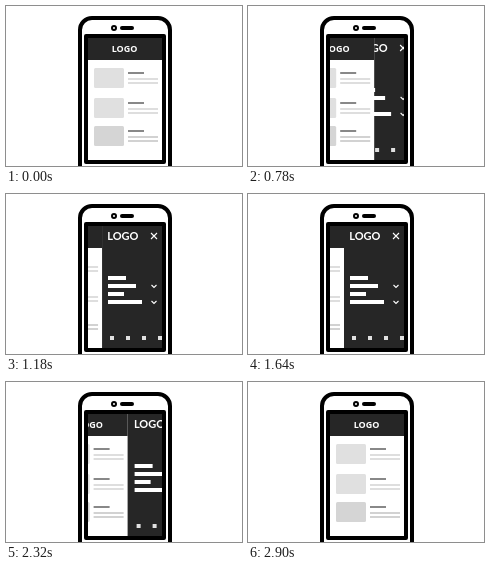
Recreate the animation shown at these times as an HTML page. Size 236 by 160 pixels, loop 3000 ms.

```html
<!DOCTYPE html>
<html lang="en">
<head>
<meta charset="utf-8">
<title>Menu slide</title>
<style>
html, body { margin: 0; width: 100%; height: 100%; overflow: hidden; background: #fff; }
svg { display: block; width: 236px; height: 160px; }
text { fill: #fff; font-weight: 700; }
.small { font-size: 9px; font-family: "Open Sans", "Noto Sans", sans-serif; }
.large { font-size: 11px; font-family: Lato, sans-serif; }
</style>
</head>
<body>
<svg viewBox="0 0 236 160">
  <clipPath id="screen"><rect x="82" y="32" width="74" height="122"/></clipPath>
  <g clip-path="url(#screen)">
    <rect x="82" y="32" width="74" height="122" fill="#262626"/>
    <g id="menu">
      <text class="large" x="101.3" y="46" textLength="">LOGO</text>
      <path d="M145 39l6 6m0-6l-6 6M145.5 91l2.5 2.5 2.5-2.5M145.5 107l2.5 2.5 2.5-2.5" fill="none" stroke="#fff" stroke-width="1.1"/>
      <path d="M102 82h18v4h-18zM102 90h28v4h-28zM102 98h16v4h-16zM102 106h34v4h-34z" fill="#fff"/>
      <path d="M104 142h4v4h-4zm16 0h4v4h-4zm16 0h4v4h-4zm16 0h4v4h-4z" fill="#e0e0e0"/>
    </g>
    <g id="page">
      <rect x="82" y="32" width="74" height="122" fill="#fff"/>
      <rect x="82" y="32" width="74" height="22" fill="#262626"/>
      <text class="small" x="118.5" y="46" text-anchor="middle">LOGO</text>
    </g>
  </g>
  <g fill="none" stroke="#000" stroke-width="4">
    <path d="M74 162V24a12 12 0 0 1 12-12h66a12 12 0 0 1 12 12v138"/>
    <path d="M80 30h78v126h-78z" stroke-linejoin="round"/>
    <path d="M116 22h10" stroke-linecap="round"/>
    <circle cx="108" cy="22" r="2" stroke-width="2"/>
  </g>
</svg>
<script>
const page = document.getElementById('page');
const menu = document.getElementById('menu');

function addRect(x, y, width, height, fill, rx = 0) {
  const rect = document.createElementNS('http://www.w3.org/2000/svg', 'rect');
  for (const [key, value] of Object.entries({ x, y, width, height, fill, rx })) rect.setAttribute(key, value);
  page.append(rect);
}

// Each item: thumbnail top, title top, thumbnail and text colours
for (const [top, title, thumb, line] of [
  [62, 66, '#e0e0e0', '#dedede'],
  [92, 96, '#e0e0e0', '#dedede'],
  [120, 124, '#d5d5d5', '#d2d2d2']
]) {
  addRect(88, top, 30, 20, thumb, 1.5);
  addRect(122, title, 16, 2, '#888');
  addRect(122, title + 6, 30, 2, line);
  addRect(122, title + 10, 30, 2, line);
}

// cubic-bezier(.25, .1, .25, 1)
function ease(x) {
  if (x <= 0) return 0;
  if (x >= 1) return 1;
  const bezier = (u, a, b) => 3 * (1 - u) ** 2 * u * a + 3 * (1 - u) * u * u * b + u ** 3;
  let low = 0, high = 1;
  for (let i = 0; i < 24; i++) {
    const mid = (low + high) / 2;
    if (bezier(mid, .25, .25) < x) low = mid; else high = mid;
  }
  return bezier(low, .1, 1);
}

const openness = (t, duration) => ease((t - 605) / duration) - ease((t - 2165) / duration);
const shift = (group, x) => group.setAttribute('transform', `translate(${x} 0)`);

function draw() {
  const t = Math.floor(performance.now() % 3000 / 20) * 20;
  shift(page, -60 * openness(t, 600));
  shift(menu, 36 * (1 - openness(t, 350)));
  requestAnimationFrame(draw);
}
draw();
</script>
</body>
</html>
```
